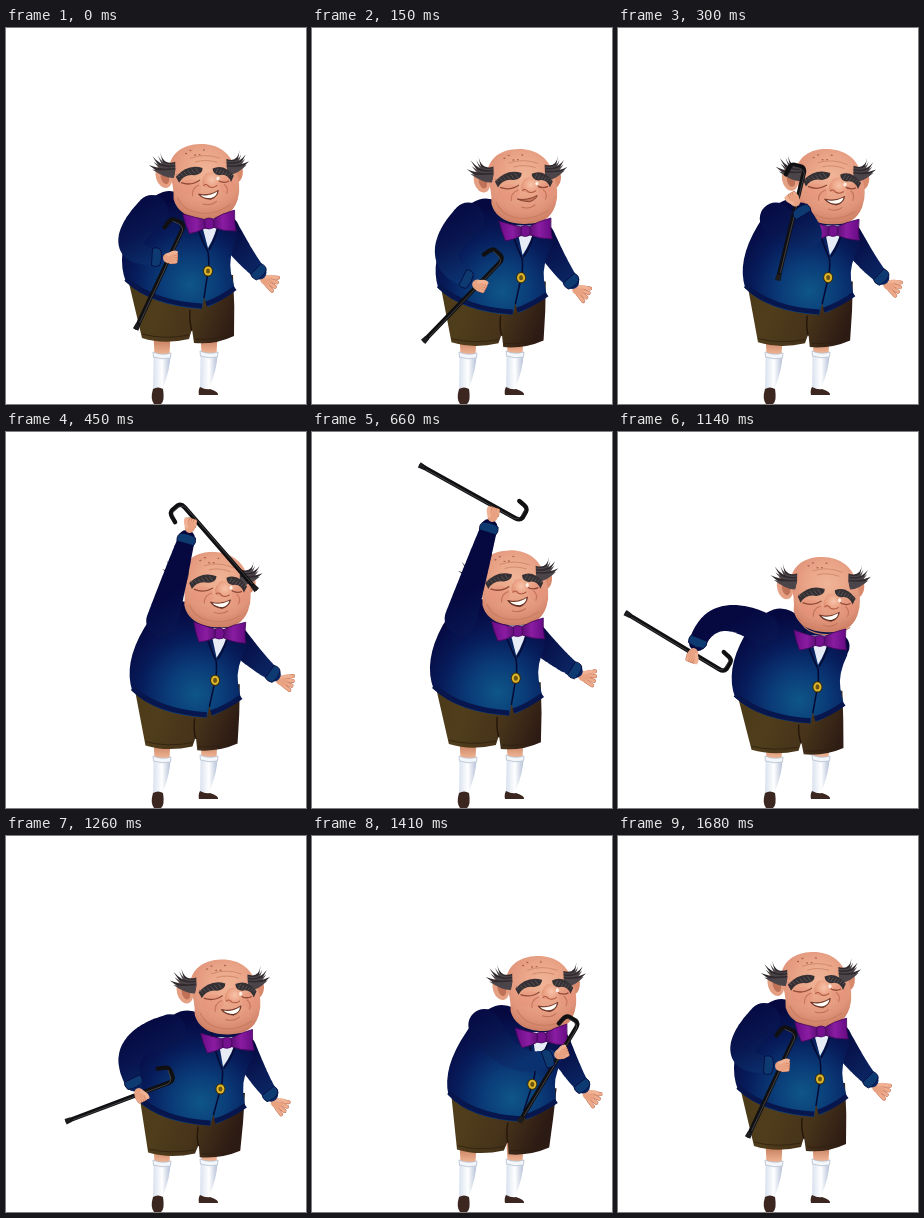
Animation of 300x376 px, one loop 1.83 s. Source, as an HTML page with a canvas:

```html
<!DOCTYPE html>
<html lang="en">
<head>
<meta charset="utf-8">
<title>Old man with a cane</title>
<style>
html, body { margin: 0; width: 100%; height: 100%; overflow: hidden; background: #fff; }
canvas { display: block; width: 100vw; height: 100vh; }
</style>
</head>
<body>
<canvas id="stage" width="300" height="376"></canvas>
<script>
const c = document.getElementById('stage').getContext('2d');
const LOOP = 1830, STEP = 30, REST = 1680;
const ARM = 95;

// Key points as time, x, y (or time, angle). Everything else follows from these.
const HEAD = [[0,194,153], [150,206,158], [450,206,157], [870,190,155], [1140,203,162], [1410,225,157], [REST,194,153]];
const HAND = [[0,163,230], [150,166,257], [450,184,95], [870,165,104], [1000,118,140], [1140,75,222], [1270,140,258], [1410,248,218], [REST,163,230]];
const TURN = [[0,115], [150,134], [450,49], [540,-50], [870,-316], [1140,-509], [1410,-599], [REST,-605]];

const lerp = (a, b, k) => a + (b - a) * k;
const rad = deg => deg * Math.PI / 180;
const bump = (t, mid, width) => Math.exp(-(((t - mid) / width) ** 2));

function slope(rows, i, j) {
  if (i === 0 || i === rows.length - 1) return 0;
  const a = rows[i - 1], b = rows[i + 1];
  return (b[j] - a[j]) / (b[0] - a[0]);
}

// Smooth curve through the key points, at rest at both ends.
function follow(rows, t) {
  let i = 0;
  while (i < rows.length - 2 && t >= rows[i + 1][0]) i++;
  const a = rows[i], b = rows[i + 1], d = b[0] - a[0], u = (t - a[0]) / d;
  return a.slice(1).map((v, n) => lerp(v, b[n + 1], u * u * (3 - 2 * u))
    + d * u * (1 - u) * ((1 - u) * slope(rows, i, n + 1) - u * slope(rows, i + 1, n + 1)));
}

function poseAt(t) {
  const head = follow(HEAD, t), hand = follow(HAND, t), [turn] = follow(TURN, t);
  const dx = head[0] - HEAD[0][1], dy = head[1] - HEAD[0][2];
  const lift = Math.max(0, 230 - hand[1]) / 140;
  const lean = Math.max(0, 130 - hand[0]) / 55;
  const toss = bump(t, 870, 90);
  const p = { head, hand, turn, toss };
  p.tilt = rad(-2 + 5 * bump(t, 400, 180) + 3 * lean - 2 * toss);
  p.face = [dx * .08, 1 + 8 * lean];
  p.grin = .5 - .5 * bump(t, 150, 100) + .5 * bump(t, 870, 160);
  p.bow = [dx * .85 - 9 * lean, dy * 1.5];
  p.hip = [dx * .4 - 7 * lean, dy * 1.2];
  p.farHand = [262 + dx * .5 + 10 * lift - 70 * lean, 253 + 2 * dy - 12 * lift];
  p.pivot = [hand[0] + 7 * lift + 12 * toss, hand[1] - 6 * lift - 11 * toss];
  p.grip = 35 - 13 * lift + 23 * toss;
  return p;
}

function paint(path, fill, stroke, width = 1) {
  const d = new Path2D(path);
  if (fill) { c.fillStyle = fill; c.fill(d); }
  if (stroke) { c.strokeStyle = stroke; c.lineWidth = width; c.stroke(d); }
}

function oval(x, y, rx, ry, fill, rot = 0) {
  c.beginPath();
  c.ellipse(x, y, rx, ry, rot, 0, Math.PI * 2);
  c.fillStyle = fill;
  c.fill();
}

function shade(g, colors) {
  colors.forEach((col, i) => g.addColorStop(i / (colors.length - 1), col));
  return g;
}
const linear = (x0, y0, x1, y1, ...cols) => shade(c.createLinearGradient(x0, y0, x1, y1), cols);
const radial = (x, y, r, ...cols) => shade(c.createRadialGradient(x, y, 0, x, y, r), cols);

function at(x, y, rot, draw) {
  c.save();
  c.translate(x, y);
  c.rotate(rot);
  draw();
  c.restore();
}

// Bends the standing body: chest and hips move while the feet stay.
function warp(p, x, y) {
  const [bx, by] = p.bow, [hx, hy] = p.hip;
  if (y < 278) {
    const k = Math.max(0, (y - 195) / 83);
    return [x + lerp(bx, hx, k), y + lerp(by, hy, k)];
  }
  const k = lerp(1, .7, (y - 278) / 35);
  return [x + hx * k, y + hy * k];
}

const bend = (p, d) => d.replace(/(-?[\d.]+),(-?[\d.]+)/g,
  (m, x, y) => warp(p, +x, +y).map(v => v.toFixed(2)).join(','));

function sleeve([ax, ay], [bx, by], [ex, ey], r0, r1, fill) {
  c.fillStyle = fill;
  c.beginPath();
  for (let i = 0; i <= 40; i++) {
    const u = i / 40, v = 1 - u, r = lerp(r0, r1, u);
    const x = v * v * ax + 2 * u * v * bx + u * u * ex;
    const y = v * v * ay + 2 * u * v * by + u * u * ey;
    c.moveTo(x + r, y);
    c.arc(x, y, r, 0, 7);
  }
  c.fill();
}

function cuff([x, y], rot, r) {
  at(x, y, rot, () => paint(`M-5,${-r} Q0,${-r - 2} 3,${-r + 1} Q6,0 3,${r} Q-2,${r + 2} -5,${r} Z`, '#0e3a72', '#060b3c', .8));
}

function fingers(x, y, rot, spread, len) {
  at(x, y, rot, () => {
    c.lineCap = 'round';
    for (let i = -1.5; i < 2; i++) {
      const a = i * spread;
      const d = `M2,${i * 2.6} L${Math.cos(a) * len},${Math.sin(a) * len + i * 1.6}`;
      paint(d, null, '#b9674c', 4);
      paint(d, null, '#eeab8b', 3.2);
    }
    oval(0, 0, 6, 5.2, '#e8a282');
    paint('M-1,-3 Q4,-7 7,-6', null, '#f0b294', 3.2);
  });
}

function sock(x, y, foot, h) {
  const w = 8.5;
  paint(`M${x - w},${y - 20} H${x + w} L${x + w - 1},${y + 2} H${x - w + 1} Z`, linear(0, y - 20, 0, y, '#b56a4d', '#efb493'));
  paint(`M${x - w},${y} Q${x - w},${y + 14} ${foot - 4},${y + h} H${foot + 5} Q${x + w},${y + 16} ${x + w},${y} Z`,
    linear(x - w, 0, x + w, 0, '#dbe3f0', '#ffffff', '#b4c1d8'));
  paint(`M${x - w - .5},${y - 2} Q${x},${y + 2} ${x + w + .5},${y - 1} L${x + w},${y + 4} Q${x},${y + 6} ${x - w},${y + 3} Z`, '#f3f6fb', '#b5bfd0', .8);
}

function legs() {
  sock(156, 326, 151, 36);
  sock(203, 325, 198, 35);
  paint('M147,361 Q152,358 157,361 Q159,373 155,376 L148,376 Q144,371 147,361 Z', '#3b2620');
  paint('M194,359 Q200,362 204,361 Q213,364 212,367 L193,367 Q192,362 194,359 Z', '#3b2620');
}

function shorts(p) {
  paint(bend(p, 'M121,247 L136,310 Q158,317 183,311 L186,301 L188,315 Q209,317 228,308 Q229,278 227,247 Z'),
    linear(120, 262, 228, 305, '#4a3a18', '#503d1b', '#46331a', '#2c1a14'));
  paint(bend(p, 'M186,303 Q183,294 184,282'), null, '#241609', 1.4);
  paint(bend(p, 'M136,306 Q158,312 183,307 M189,311 Q209,313 227,305'), null, '#2f2010', .8);
}

function jacket(p) {
  const [x, y] = warp(p, 184, 257);
  paint(bend(p, 'M157,164 Q172,160 186,174 L216,185 Q231,190 231,210 Q222,230 225,245 L229,262 Q214,274 202,279 L198,269 L196,281 Q145,278 120,254 Q109,226 128,190 Q140,170 157,164 Z'),
    radial(x, y, 85, '#0f5687', '#0a3c78', '#071b5a', '#060940'));
  paint(bend(p, 'M120,251 Q147,275 196,278 M200,276 Q215,271 229,260'), null, '#07164d', 5);
  paint(bend(p, 'M194,190 L213,190 Q210,207 202,220 Z'), '#e6ebf6');
  paint(bend(p, 'M187,184 Q192,205 202,224 Q204,238 201,250 L198,270 M214,190 Q211,209 203,222'), null, '#050a33', 1.5);
  const [bx, by] = warp(p, 202, 243);
  oval(bx, by, 5, 5.6, '#3a2c08');
  oval(bx, by, 4, 4.6, '#dcb62c');
  oval(bx, by, 2, 2.6, '#6d5410');
}

function bowTie(p) {
  const [x, y] = warp(p, 203, 195);
  at(x, y, p.tilt, () => {
    const g = linear(-26, 0, 27, 0, '#6b0b86', '#8a1ca2', '#4b0763', '#8a1ca2', '#650a82');
    paint('M-2,-3 Q-14,-6 -26,-10 Q-24,0 -20,10 Q-11,9 -2,4 Z', g, '#42075a', .8);
    paint('M3,-3 Q13,-9 26,-12 Q25,0 27,9 Q14,9 3,4 Z', g, '#42075a', .8);
    paint('M-4,-4 Q0,-6 4,-4 Q6,0 4,5 Q0,7 -4,5 Z', '#75108f', '#42075a', .8);
  });
}

// A fan of pointed locks swept up and outward.
function tuft(x, y, dir, len) {
  at(x, y, 0, () => {
    c.scale(dir, 1);
    for (let i = 0; i < 6; i++) {
      const a = -1.15 + i * .24, l = len * (1 - .18 * (i % 2));
      paint(`M-7,${i * 1.5 - 6} Q${l * .3},${i - 2} ${Math.cos(a) * l},${Math.sin(a) * l} Q${l * .25},${i + 5} -5,${i + 5} Z`, i % 2 ? '#4b4448' : '#302a2e');
    }
  });
}

// Thin and high at the inner end, thick and low at the outer end.
function brow(x, y, w, dir) {
  at(x, y, 0, () => {
    c.scale(dir, 1);
    paint(`M0,0 Q${w * .55},-5 ${w},8 L${w - 3},14 Q${w * .7},5 ${w * .3},7 Q0,6 0,0 Z`, '#353033');
    for (let i = 1; i < 7; i++) {
      const k = i / 7;
      paint(`M${w * k},${4 + 5 * k} l${w * .12},${-5 + 3 * k}`, null, '#625a5d', .8);
    }
  });
}

function mouth(h) {
  paint(`M-10,0 Q0,${2 + h * 2} 10,-3 Q9,${1 + h * 6} 2,${3 + h * 6} Q-7,${2 + h * 6} -10,0 Z`, h > .12 ? '#471c1a' : '#c8775c', '#7b3a2a', .9);
  if (h > .12) paint(`M-8,1 Q0,${2 + h * 2} 9,-2 Q8,${2 + h * 3} 2,${3 + h * 3.5} Q-5,${3 + h * 3} -8,1 Z`, '#fffdf6');
  paint(`M-6,${8 + h * 4} Q2,${11 + h * 4} 8,${6 + h * 4}`, null, '#bd7055');
}

function head(p) {
  at(p.head[0], p.head[1], p.tilt, () => {
    oval(38, -6, 5, 9, '#d98a6d', .2);
    oval(-36, -6, 8, 12, '#e5a083', -.25);
    oval(-35, -5, 4, 7, '#bf7257', -.25);
    paint('M-31,-10 C-30,-29 -16,-37 1,-37 C19,-37 32,-27 35,-12 Q42,5 37,20 C32,34 22,38 9,38 C-10,39 -24,31 -27,17 Q-26,3 -31,-10 Z',
      radial(6, -10, 54, '#f0b496', '#eba78a', '#e1957a', '#c4755a'));
    for (let i = 0; i < 5; i++) oval(-13 + i * 4.5, -28 - 3 * Math.sin(i * 1.9), 1.1, .7, '#a9614b');
    paint('M-9,-23 Q6,-28 21,-22 M-4,-19 Q6,-22 18,-18', null, '#cf8869', .9);
    tuft(-31, -14, -1, 20);
    tuft(34, -15, 1, 16);
    at(p.face[0], p.face[1], 0, () => {
      oval(-10, 5, 11, 8, '#e98f7866');
      oval(27, 4, 8, 8, '#e98f7866');
      paint('M-19,0 Q-9,4 0,-2 M16,-2 Q23,3 29,0', null, '#8e4a36', 1.3);
      paint('M-1,3 Q-9,6 -8,14 M24,3 Q29,7 26,13', null, '#c4775c', 1.2);
      paint('M-23,15 Q-18,27 -6,30 Q12,35 29,24', null, '#c97e62', 1.2);
      brow(3, -14, 27, -1);
      brow(13, -13, 21, 1);
      paint('M6,-8 Q13,-12 15,-5 Q22,0 17,5 Q10,8 3,4 Q0,-1 6,-8 Z', radial(12, -2, 14, '#f7c3aa', '#eba284', '#d47d64'));
      paint('M3,4 Q6,1 9,5 Q13,7 17,4', null, '#a9553f');
      oval(18, -3, 1.6, 2, '#ffeee4');
      at(8, 12, 0, () => mouth(p.grin));
    });
  });
}

function cane(p) {
  at(p.pivot[0], p.pivot[1], rad(p.turn), () => {
    c.translate(-p.grip, 0);
    c.lineCap = c.lineJoin = 'round';
    paint('M9,17 L4,16 Q-2,15 -2,11 L-2,4 Q-1,0 4,0 L112,0', null, '#101012', 4.4);
    paint('M0,12 L0,5 Q1,-.8 6,-.8 L106,-.8', null, '#48484c', .8);
    paint('M108,-2.4 L114,-3 L114,3 L108,2.4 Z', '#1c1c1f');
  });
}

const wrist = (h, a) => [h[0] - Math.cos(a) * 12, h[1] - Math.sin(a) * 12];

function farArm(p) {
  const s = warp(p, 220, 201), h = p.farHand;
  const mid = [(s[0] + h[0]) / 2 - 2, (s[1] + h[1]) / 2 + 3];
  const a = Math.atan2(h[1] - mid[1], h[0] - mid[0]), w = wrist(h, a);
  fingers(h[0] - 2, h[1] - 1, a - .35, .3, 11);
  sleeve(s, mid, w, 13, 7, linear(s[0], s[1], w[0], w[1], '#060940', '#0b2866'));
  cuff(w, a, 7.5);
}

function nearArm(p) {
  const s = warp(p, 146, 183), h = p.hand;
  const dx = h[0] - s[0], dy = h[1] - s[1], d = Math.hypot(dx, dy);
  const out = .7 * Math.sqrt(Math.max(0, ARM * ARM - d * d)) / d;
  const e = [s[0] + dx / 2 - dy * out, s[1] + dy / 2 + dx * out];
  const a = Math.atan2(h[1] - e[1], h[0] - e[0]), w = wrist(h, a);
  sleeve(s, e, w, 16, 8.5, linear(s[0] - 20, s[1] - 15, s[0] + 15, s[1] + 50, '#060840', '#081650', '#0b3270'));
  cane(p);
  fingers(h[0], h[1], a, lerp(.08, .3, p.toss), lerp(7, 10, p.toss));
  cuff(w, a, 8.5);
}

function draw(t) {
  const p = poseAt(t);
  c.fillStyle = '#fff';
  c.fillRect(0, 0, 300, 376);
  [farArm, legs, shorts, jacket, head, bowTie, nearArm].forEach(part => part(p));
}

const start = performance.now();
function tick() {
  const t = (performance.now() - start) % LOOP;
  draw(Math.min(REST, Math.floor(t / STEP) * STEP));
  requestAnimationFrame(tick);
}
tick();
</script>
</body>
</html>
```
